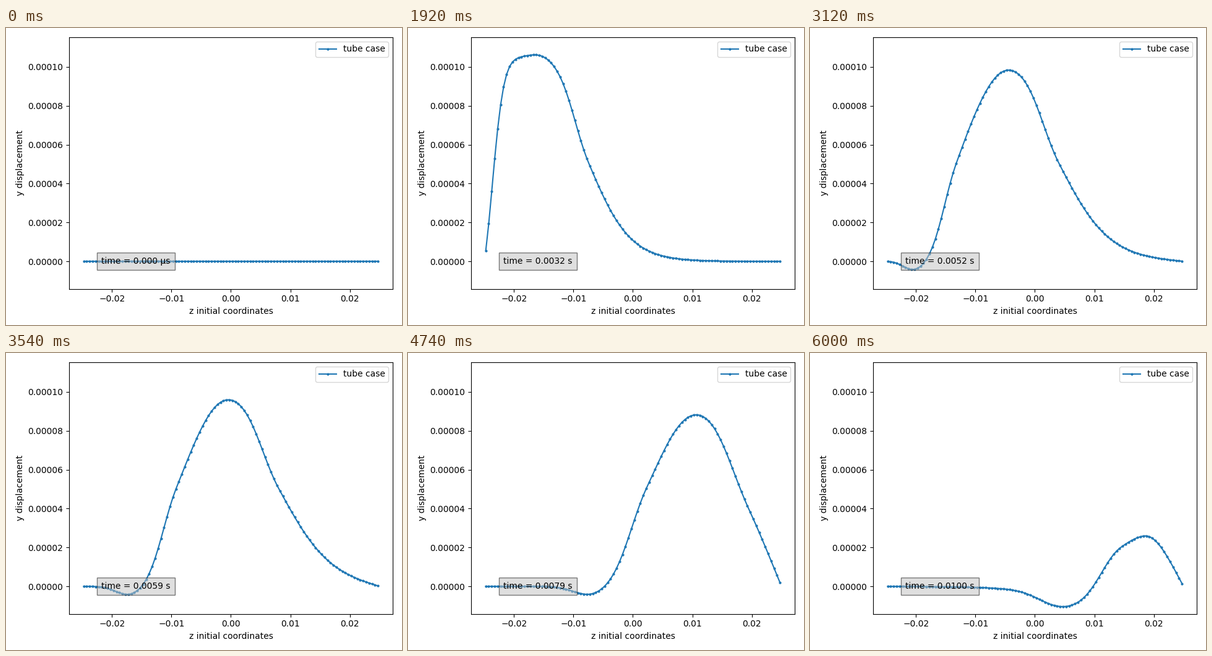
A matplotlib script for the animation above (6060 ms loop, 640x480 px).

```python
import math

import numpy as np
import matplotlib.pyplot as plt
from matplotlib.animation import FuncAnimation

FRAMES, INTERVAL = 101, 60
STEP = 0.1          # simulated milliseconds per frame
LENGTH = 50         # tube length, mm
SPEED = 5.76        # wave speed, mm/ms
DELAY = 0.15        # start-up lag of the wall, ms
PULSE = 3           # how long the inlet pressure lasts, ms

erf = np.vectorize(math.erf)


def step_front(d, t):
    """Travelling step: long tail ahead, steep and overshooting behind."""
    x = (d - SPEED * (t - DELAY)) / (2.25 * t ** 0.38)
    rise = 1 / (1 + np.exp(x - 0.6 * np.minimum(x, 0) ** 2))
    overshoot = 0.043 * np.exp(-((x + 2.35) / 0.91) ** 2)
    return rise + overshoot


def step_response(d, t):
    """Front minus its reflection from the open outlet."""
    if t <= 0:
        return np.zeros_like(d)
    return step_front(d, t) - step_front(2 * LENGTH - d, t)


def displacement(z, k):
    d = z * 1e3 + LENGTH / 2  # mm from the inlet
    t = k * STEP
    clamp = erf(d / 2.8)
    gain = 1.01 + 0.1 * np.exp(-(d / 6) ** 2)
    wave = step_response(d, t) - step_response(d, t - PULSE)
    return 1e-4 * clamp * gain * wave


def time_label(k):
    return f"time = {k * STEP / 1e3:.4f} s" if k else "time = 0.000 µs"


z = np.linspace(-0.02475, 0.02475, 100)

fig, ax = plt.subplots(figsize=(6.4, 4.8), dpi=100)
line, = ax.plot(z, 0 * z, "o-", markersize=2, label="tube case")
label = ax.text(0.1, 0.1, time_label(0), transform=ax.transAxes,
                bbox=dict(facecolor="silver", alpha=0.5, pad=5))
ax.set_xlim(-0.027225, 0.027225)
ax.set_ylim(-1.418e-5, 1.152e-4)
ax.set_xlabel("z initial coordinates")
ax.set_ylabel("y displacement")
ax.legend(loc="upper right")
fig.tight_layout()
fig.subplots_adjust(left=101.9 / 640)


def update(k):
    line.set_ydata(displacement(z, k))
    label.set_text(time_label(k))
    return line, label


anim = FuncAnimation(fig, update, frames=FRAMES, interval=INTERVAL,
                     repeat=True, repeat_delay=0)
plt.show()
```
